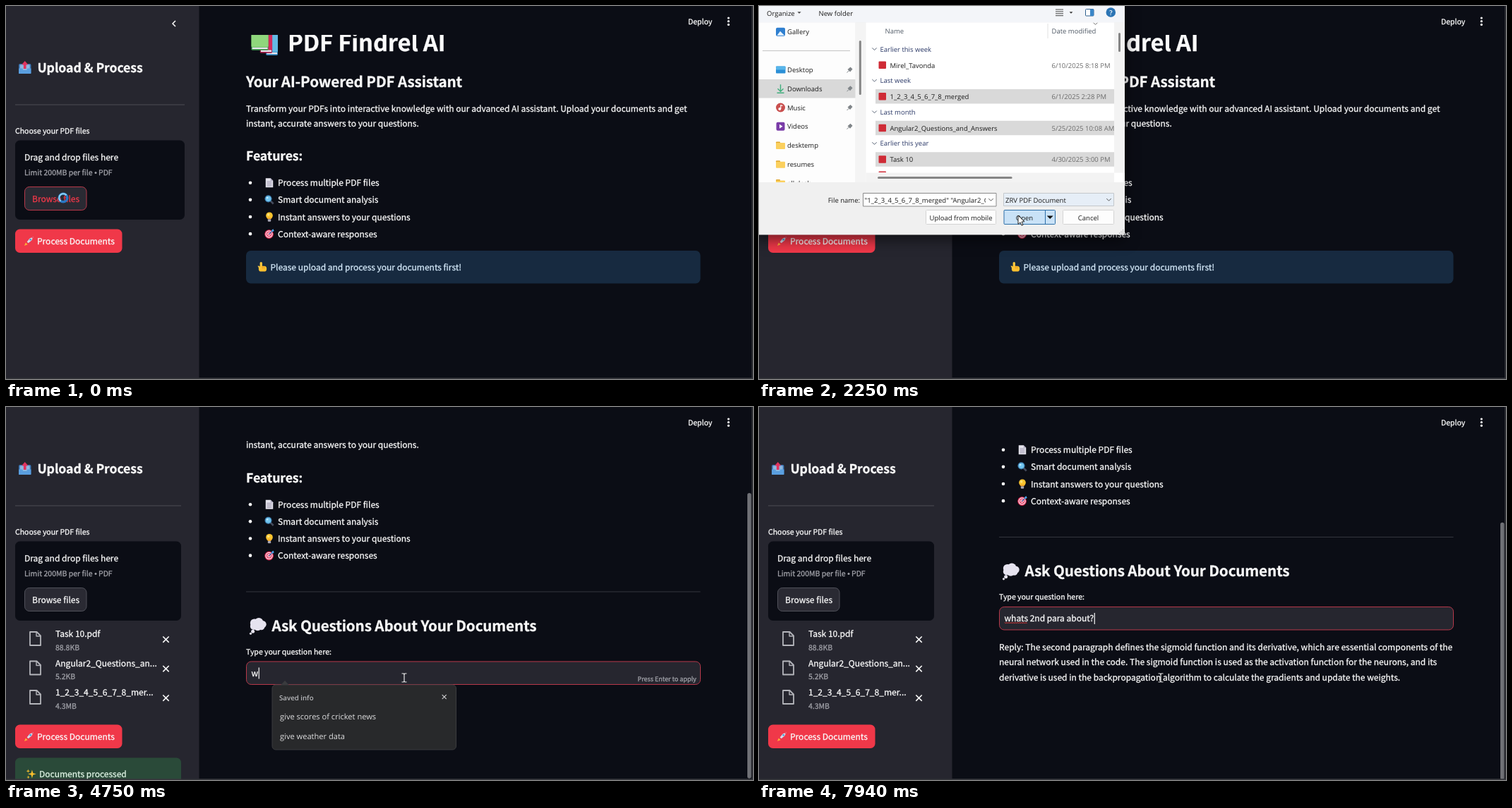
Write an HTML page with a canvas that moves like this. It is 1058 px wide and 529 px high and loops after 8 s.

```html
<!DOCTYPE html>
<html lang="en">
<head>
<meta charset="utf-8">
<title>PDF assistant demo</title>
<style>
html, body { margin: 0; width: 100%; height: 100%; overflow: hidden; background: #0b0d15; }
canvas { display: block; width: 1058px; height: 529px; }
</style>
</head>
<body>
<canvas id="stage" width="1058" height="529"></canvas>
<script>
const c = document.getElementById('stage').getContext('2d');
const LOOP = 8000;
const APP = '"Noto Sans CJK SC", "Noto Sans CJK JP", "Noto Sans CJK KR", "Noto Sans", sans-serif';
const UI = '"Open Sans", "Noto Sans", sans-serif';
const BG = '#0b0d15', SIDE = '#26262f', WHITE = '#fafafa', RED = '#f03849';

const T = {
  dialogOpen: 400, dialogClose: 2380, uploaded: 2700, processed: 3550,
  focus: 4250, firstKey: 4690, popupEnd: 4880, enter: 7050, reply: 7690
};

// ---------- helpers ----------
const clamp01 = v => Math.max(0, Math.min(1, v));
const ease = (t, a, b) => { const u = clamp01((t - a) / (b - a)); return u * u * (3 - 2 * u); };

function box(x, y, w, h, r, fill, stroke, lw = 1) {
  c.beginPath();
  c.roundRect(x, y, w, h, r);
  if (fill) { c.fillStyle = fill; c.fill(); }
  if (stroke) { c.strokeStyle = stroke; c.lineWidth = lw; c.stroke(); }
}
function disc(x, y, r, fill) {
  c.beginPath();
  c.arc(x, y, r, 0, 7);
  c.fillStyle = fill;
  c.fill();
}
function trace(points, close) {
  c.beginPath();
  points.forEach(([x, y]) => c.lineTo(x, y));
  if (close) c.closePath();
}
function poly(points, fill) { trace(points, true); c.fillStyle = fill; c.fill(); }
function line(points, color, lw = 1) {
  trace(points);
  c.strokeStyle = color;
  c.lineWidth = lw;
  c.stroke();
}
function clipped(x, y, w, h, draw) {
  c.save();
  c.beginPath();
  c.rect(x, y, w, h);
  c.clip();
  draw();
  c.restore();
}
function write(s, x, y, font, color, align = 'left', spacing = 0) {
  c.font = font;
  c.letterSpacing = spacing + 'px';
  c.textAlign = align;
  c.fillStyle = color;
  c.fillText(s, x, y);
}
// The CJK face draws its Latin letters larger than their nominal size.
const latinScale = { 400: 1.1105, 600: 1.132, 700: 1.117 };
const appFont = (px, weight = 400) => `${weight} ${px / latinScale[weight]}px ${APP}`;
function app(s, x, cy, px = 13.33, color = WHITE, weight = 400) {
  const y = cy + px * 0.34;
  write(s, x, y, appFont(px, weight), color, 'left', weight > 400 ? -px * 0.005 : 0);
  // A hairline outline brings the strokes up to the page's medium weight.
  c.strokeStyle = color;
  c.lineWidth = 0.3;
  c.lineJoin = 'round';
  c.strokeText(s, x, y);
}
function ui(s, x, cy, color = '#1c1c1c', align = 'left', px = 9.5, weight = 400) {
  write(s, x, cy + px * 0.37, `${weight} ${px}px ${UI}`, color, align);
}
const chevron = (x, y, r, color, lw = 1) => line([[x - r, y - r / 2], [x, y + r / 2], [x + r, y - r / 2]], color, lw);
const triangle = (x, y, r, color) => poly([[x - r, y - r / 2], [x + r, y - r / 2], [x, y + r / 2]], color);
function cross(x, y, r, color, lw) {
  line([[x - r, y - r], [x + r, y + r]], color, lw);
  line([[x - r, y + r], [x + r, y - r]], color, lw);
}

// ---------- emoji, each on a 16 unit square ----------
const emoji = {
  doc() {
    poly([[2, 0.5], [10, 0.5], [14, 4.5], [14, 15.5], [2, 15.5]], '#e4e3ec');
    poly([[10, 0.5], [14, 4.5], [10, 4.5]], '#aaa6bd');
    for (let i = 0; i < 4; i++) line([[4, 6 + i * 2.3], [12, 6 + i * 2.3]], '#8d87a0', 0.9);
  },
  glass() {
    line([[9.5, 9.5], [14.5, 14.5]], '#444b5c', 3);
    disc(6.3, 6.3, 5.8, '#3a78a8');
    disc(6.3, 6.3, 4.4, '#72c5ef');
    disc(4.8, 4.8, 1.5, '#c0ebff');
  },
  bulb() {
    disc(8, 6, 5.5, '#fbc42f');
    poly([[4, 9], [12, 9], [10.5, 12], [5.5, 12]], '#f2a92c');
    disc(6.5, 4.5, 2, '#ffe47c');
    box(5.5, 12, 5, 3.6, 1, '#a9a7b4');
  },
  target() {
    ['#e62e58', '#f6e9ef', '#e62e58', '#f6e9ef', '#e62e58'].forEach((k, i) => disc(7.5, 8.5, 7.2 - i * 1.45, k));
    line([[7.5, 8.5], [13, 3]], '#376fb5', 1.4);
    poly([[11.5, 4.5], [12, 1.5], [14.5, 0], [15, 2], [16, 2.5], [14, 4.5]], '#4aa3ea');
  },
  point() {
    box(4, 0.5, 3.6, 10, 1.8, '#ffc83d');
    box(2, 7, 12.5, 8.5, 4, '#ffc02f');
    poly([[0.5, 7], [2.5, 6.5], [5, 10], [4, 13]], '#ffc83d');
    for (const x of [8, 10.5]) line([[x, 7.5], [x, 11]], '#d88a1c', 0.8);
  },
  rocket() {
    poly([[4, 7], [8, 4.5], [7, 9]], '#e23a5e');
    poly([[9, 12], [11.5, 8], [7, 9]], '#e23a5e');
    poly([[5, 9], [9, 4], [15, 1], [12, 7], [7, 11]], '#dcdbe6');
    poly([[12, 2.4], [15, 1], [13.6, 4]], '#e23a5e');
    disc(10.3, 5.7, 1.5, '#4aa0d8');
    poly([[1, 15], [3, 10], [6, 13]], '#ffad38');
  },
  outbox() {
    box(0.5, 3.5, 15, 12, 1.5, '#3c78b8');
    box(2, 4.5, 12, 7, 1, '#8fb8e0');
    poly([[0.5, 9], [5, 9], [6, 11.5], [10, 11.5], [11, 9], [15.5, 9], [15.5, 15.5], [0.5, 15.5]], '#5a9fe0');
    poly([[8, 0], [12, 4.5], [9.6, 4.5], [9.6, 9.5], [6.4, 9.5], [6.4, 4.5], [4, 4.5]], '#e2335f');
  },
  books() {
    const book = (x, y, w, h, k, edge) => {
      box(x, y, w, h, 0.6, edge);
      box(x + 0.5, y + h - 1.7, w - 0.9, 1, 0, '#ece7f0');
      box(x, y, w, h - 1.9, 0.6, k);
    };
    book(8.8, 1.5, 7, 14.3, '#63b9e4', '#2c7fb4');
    book(5.3, 1, 7.2, 13.4, '#d22a5c', '#a01c48');
    book(0.2, 1, 10, 11.8, '#8fd67c', '#3f9a50');
  },
  cloud() {
    const puff = '#e6e3ef';
    for (const [x, y, r] of [[5, 5, 3.8], [9, 4.3, 4], [12.4, 6.2, 3.4], [8, 8, 4], [4.4, 8, 3.2], [11.4, 8.6, 2.8]]) disc(x, y, r, puff);
    disc(3.6, 12.6, 1.6, puff);
    disc(1.6, 14.6, 1, puff);
  },
  spark() {
    const star = (x, y, r) => {
      const p = [];
      for (let i = 0; i < 8; i++) {
        const a = i * Math.PI / 4, d = i % 2 ? r * 0.32 : r;
        p.push([x + d * Math.cos(a), y + d * Math.sin(a)]);
      }
      poly(p, '#fbc02d');
    };
    star(9.5, 8, 6.3);
    star(3.5, 3.5, 3);
    star(3.8, 12.8, 2.6);
  }
};
function icon(name, x, y, size) {
  c.save();
  c.translate(x, y);
  c.scale(size / 16, size / 16);
  emoji[name]();
  c.restore();
}

// ---------- state over time ----------
const mousePath = [
  [0, 81, 272], [500, 81, 272], [900, 150, 190], [1280, 128, 129], [1480, 128, 129], [1660, 153, 129],
  [1760, 230, 130], [1850, 232, 173], [1950, 222, 217], [2190, 367, 297], [2420, 367, 297],
  [3050, 117, 476], [3420, 117, 476], [3700, 420, 420], [4050, 564, 384], [7640, 564, 384], [7800, 569, 384]
];
function mouseAt(t) {
  for (let i = 1; i < mousePath.length; i++) {
    const [ta, xa, ya] = mousePath[i - 1], [tb, xb, yb] = mousePath[i];
    if (t <= tb) {
      const u = ease(t, ta, tb);
      return { x: xa + (xb - xa) * u, y: ya + (yb - ya) * u };
    }
  }
  const [, x, y] = mousePath[mousePath.length - 1];
  return { x, y };
}

const QUESTION = 'whats 2nd para about?';
const keyTimes = [[T.firstKey, 1], [4940, 2], [5690, 11], [5940, 14], [6630, 20], [6880, 21]];
function typedCount(t) {
  if (t < T.firstKey) return 0;
  for (let i = 1; i < keyTimes.length; i++) {
    const [ta, na] = keyTimes[i - 1], [tb, nb] = keyTimes[i];
    if (t < tb) return Math.floor(na + (nb - na) * (t - ta) / (tb - ta) + 1e-6);
  }
  return QUESTION.length;
}

// ---------- sidebar ----------
const files = [['Task 10.pdf', '88.8KB'], ['Angular2_Questions_an...', '5.2KB'], ['1_2_3_4_5_6_7_8_mer...', '4.3MB']];

function sidebar(t, mouse) {
  const uploaded = t >= T.uploaded, right = uploaded ? 248 : 253, hovered = mouse.x < 273;
  box(0, 0, 273.5, 527, 0, SIDE);
  if (hovered) {
    const x = right - 15;
    line([[x + 2, 21], [x - 2, 25], [x + 2, 29]], WHITE, 1.6);
  }
  icon('outbox', 17.5, 78, 18.5);
  app('Upload & Process', 44.5, 87.5, 20, WHITE, 600);
  box(13, 139.5, right - 13, 1, 0, '#4c4c54');
  app('Choose your PDF files', 13, 177, 11.67);
  box(13, 190.5, right - 13, 112.5, 6.7, BG);
  app('Drag and drop files here', 26, 214.5);
  app('Limit 200MB per file', 26, 236, 11.67, '#a0a1a8');
  disc(127, 236.5, 1.5, '#a0a1a8');
  app('PDF', 131, 236, 11.67, '#a0a1a8');
  const hot = t < T.dialogOpen;
  box(26.5, 256.5, 87.5, 33, 6.7, '#2a2a33', hot ? '#b8394a' : '#50515a');
  app('Browse files', 37, 273, 13.33, hot ? RED : WHITE);

  if (uploaded) files.forEach(([name, size], i) => {
    const y = i * 41.5;
    trace([[34, 319 + y], [43.5, 319 + y], [49, 324.5 + y], [49, 338 + y], [34, 338 + y]], true);
    c.strokeStyle = '#b4b5bb';
    c.lineWidth = 1.8;
    c.lineJoin = 'round';
    c.stroke();
    line([[43, 319 + y], [43, 325 + y], [49, 325 + y]], '#b4b5bb', 1.4);
    app(name, 70, 321.5 + y);
    app(size, 70, 340.7 + y, 11.67, '#a0a1a8');
    cross(226.5, 329.7 + y, 4.2, WHITE, 1.6);
  });

  const by = uploaded ? 450.5 : 316.5;
  box(13, by, 151.5, 33.5, 6.7, RED);
  icon('rocket', 25, by + 9.5, 15);
  app('Process Documents', 44, by + 16.7);

  if (t >= T.processed && t < T.enter) {
    box(13, 497.5, 235, 40, 6.7, '#2a4a39');
    icon('spark', 28, 513, 15);
    app('Documents processed', 47, 520.7, 13.33, '#dff3e5');
  }
  if (uploaded && hovered) box(268, -4, 5.5, 500, 3, '#707178');
}

// ---------- main page ----------
const features = [['doc', 'Process multiple PDF files'], ['glass', 'Smart document analysis'],
  ['bulb', 'Instant answers to your questions'], ['target', 'Context-aware responses']];
const reply = [
  'Reply: The second paragraph defines the sigmoid function and its derivative, which are essential components of the',
  'neural network used in the code. The sigmoid function is used as the activation function for the neurons, and its',
  'derivative is used in the backpropagation algorithm to calculate the gradients and update the weights.'
];

function questionBox(t) {
  const count = typedCount(t), focused = t >= T.focus, typed = QUESTION.slice(0, count);
  box(340.5, 473.5, 643, 32.5, 6.7, SIDE, focused ? '#b8384a' : SIDE);
  app(typed, 347.5, 489.7);
  if (focused) box(348 + c.measureText(typed).width, 482, 1.2, 16, 0, WHITE);
  if (count > 5) {
    const end = 347.5 + c.measureText('whats').width, wave = [];
    for (let x = 348; x <= end; x += 1.5) wave.push([x, 496 + (wave.length % 2 ? 1 : -0.6)]);
    line(wave, '#e23b3b', 1);
  }
  if (count && t < T.enter) app('Press Enter to apply', 894.5, 498, 10, '#a0a1a8');
}

function page(t) {
  icon('books', 347, 32, 38.5);
  app('PDF Findrel AI', 399, 51.5, 36.67, WHITE, 700);
  app('Your AI-Powered PDF Assistant', 340, 107, 23.33, WHITE, 600);
  app('Transform your PDFs into interactive knowledge with our advanced AI assistant. Upload your documents and get', 340, 145);
  app('instant, accurate answers to your questions.', 340, 166.3);
  app('Features:', 340, 212.5, 20, WHITE, 600);
  features.forEach(([name, label], i) => {
    const y = 250.7 + i * 24.15;
    disc(346, y, 2.3, WHITE);
    icon(name, 366, y - 7, 14);
    app(label, 385, y);
  });
  if (t < T.processed) {
    box(340, 347, 643.5, 46.5, 6.7, '#172a40');
    icon('point', 356, 362.5, 14.5);
    app('Please upload and process your documents first!', 374.5, 370.3, 13.33, '#d3e8f8');
    return;
  }
  box(340, 374, 643.5, 1, 0, '#34363e');
  icon('cloud', 344, 411, 25);
  app('Ask Questions About Your Documents', 376.5, 422.5, 23.33, WHITE, 600);
  app('Type your question here:', 340, 459.5, 11.67);
  questionBox(t);
  if (t >= T.reply) reply.forEach((s, i) => app(s, 340, 530.3 + i * 21.4));
}

function popup() {
  poly([[389, 394.5], [395, 388], [401, 394.5]], '#3a3b3e');
  box(377, 394, 260.5, 92, 5, '#28292b', '#3a3b3e');
  ui('Saved info', 387, 412, '#b9babd', 'left', 9.7, 600);
  cross(620.7, 411.2, 3, '#d4d4d6', 1.1);
  ui('give scores of cricket news', 388, 438.7, '#dededf', 'left', 11.1);
  ui('give weather data', 388, 467, '#dededf', 'left', 11.1);
}

function main(t, mouse) {
  const scroll = 112.5 * ease(t, 3700, 3950) + 77.5 * ease(t, T.reply, T.reply + 150);
  clipped(273.5, 41, 783, 486, () => {
    c.translate(0, -scroll);
    page(t);
  });
  app('Deploy', 966, 21.7, 11.67);
  for (const y of [17, 21.7, 26.4]) disc(1023.3, y, 1.6, WHITE);
  if (t >= T.processed && mouse.x > 273) {
    const pageHeight = t < T.reply ? 686 : 761;
    box(1050, 527 * (46.3 + scroll) / pageHeight, 5.5, 527 * 527 / pageHeight, 3, '#6f7075');
  }
  if (t >= T.firstKey && t < T.popupEnd) popup();
}

// ---------- file dialog ----------
const places = [['Gallery', 36.7], ['Desktop', 90.5], ['Downloads', 117.2], ['Music', 144], ['Videos', 170.7],
  ['desktemp', 197.5], ['resumes', 224.2], ['all desk', 251]];
const groups = [
  ['Earlier this week', 'Mirel_Tavonda', '6/10/2025 8:18 PM'],
  ['Last week', '1_2_3_4_5_6_7_8_merged', '6/1/2025 2:28 PM'],
  ['Last month', 'Angular2_Questions_and_Answers', '5/25/2025 10:08 AM'],
  ['Earlier this year', 'Task 10', '4/30/2025 3:00 PM']
];

function placeIcon(i, y) {
  if (i === 0) {
    box(24, y - 6, 13, 12, 2, '#2f7fd0');
    poly([[25.5, y + 5], [30, y - 1], [36, y + 5]], '#e6f3ff');
  } else if (i === 1) {
    box(24, y - 5, 13.5, 10, 1, '#2b8fd6');
    box(24, y - 5, 13.5, 5, 1, '#58b5ea');
  } else if (i === 2) {
    line([[30.5, y - 6], [30.5, y + 3]], '#3fae7c', 1.4);
    line([[26.5, y], [30.5, y + 4], [34.5, y]], '#3fae7c', 1.4);
    line([[25.5, y + 6], [35.5, y + 6]], '#3fae7c', 1.4);
  } else if (i === 3) {
    disc(30.5, y, 6.5, '#c9504f');
    disc(29.3, y + 2, 1.9, '#fff');
    line([[30.8, y + 2], [30.8, y - 3.5], [33.5, y - 2.5]], '#fff', 1.2);
  } else if (i === 4) {
    box(24.5, y - 6, 12, 12, 2, '#7a3ca8');
    poly([[29, y - 3], [33.5, y], [29, y + 3]], '#fff');
  } else {
    box(24, y - 5, 6, 4, 1, '#e0a52c');
    box(24, y - 3.5, 13, 9, 1, '#fbd05e');
  }
}

function dialogPlaces(d, listFocus) {
  box(0, 23, 112 + d, 227, 0, '#fdfdfd');
  box(112 + d, 23, 15, 227, 0, '#f4f4f4');
  if (listFocus) box(0, 104, 112 + d, 26.5, 0, '#d9d9d9');
  else box(-1, 104, 112.5 + d, 26, 0, '#cfe5f8', '#27618f');
  box(5, 63, 99.5 + d, 1, 0, '#c4c4c4');
  places.forEach(([name, y], i) => {
    placeIcon(i, y);
    ui(name, 40, y);
    if (i > 0 && i < 5) {
      const x = 104 + d;
      line([[x - 4, y + 4], [x - 0.5, y + 0.5]], '#808589', 1);
      poly([[x - 3, y - 0.5], [x + 1, y - 4], [x + 4, y - 1], [x + 0.5, y + 3]], '#808589');
    }
  });
  box(117.3 + d, 49, 3, 77, 1.5, '#868686');
}

function dialogList(d, picked, blurred) {
  box(127 + d, 23, 376 - d, 227, 0, '#fff');
  ui('Name', 154 + d, 35.7, '#505a66');
  ui('Date modified', 390 + d, 35.7, '#505a66');
  box(384 + d, 25, 1, 21, 0, '#e2e2e2');
  chevron(452 + d, 25, 3, '#777');
  clipped(127 + d, 46, 376 - d, 190, () => {
    groups.forEach(([group, name, date], i) => {
      const y = 61 + i * 44.6, row = y + 23;
      chevron(139 + d, y, 3.2, '#5a6577');
      ui(group, 147 + d, y, '#2c3a68');
      if (i > 0 && i <= picked) box(140.5 + d, row - 10.5, 400, 20.5, 0, blurred ? '#d9d9d9' : '#cce8ff');
      box(145 + d, row - 5.5, 10.5, 10.5, 1, '#cf2b36');
      ui(name, 161 + d, row);
      ui(date, 390 + d, row, '#6a6a6a');
    });
    box(145 + d, 234.5, 10.5, 10.5, 1, '#cf2b36');
  });
  box(127 + d, 236.5, 376 - d, 13.5, 0, '#f3f3f3');
  box(143.5 + d, 242, 220 - d * 1.2, 3, 1.5, '#868686');
  box(503, 23, 15, 213.5, 0, '#f3f3f3');
  box(503, 236.5, 15, 13.5, 0, '#fff');
  box(509, 38, 3, 27, 1.5, '#868686');
}

function dialog(t) {
  const d = 24.5 * ease(t, 1480, 1660);
  const picked = [1770, 1860, 1960].filter(s => t >= s).length;
  const overOpen = t > 2140;
  c.save();
  c.shadowColor = 'rgba(0,0,0,.55)';
  c.shadowBlur = 20;
  c.shadowOffsetY = 7;
  box(-8, -8, 526, 332.5, 3, '#f0f0f0');
  c.restore();
  box(0, 0, 518, 23.5, 0, '#f3f5f9');

  ui('Organize', 11, 10);
  triangle(57, 9.5, 2.6, '#444');
  ui('New folder', 84.5, 10);
  for (let i = 0; i < 4; i++) box(420, 4.5 + i * 2.9, 11, 1, 0, '#444');
  triangle(442, 9.5, 2.4, '#333');
  box(462.5, 4.5, 11.5, 9.5, 1, '#fff', '#2d5f8e');
  box(469, 4.5, 5, 9.5, 0, '#3a86c8');
  disc(498.3, 9, 6.8, '#2b74b4');
  ui('?', 498.3, 9, '#fff', 'center', 9.5, 600);

  clipped(0, 23.5, 518, 226.5, () => {
    dialogPlaces(d, picked > 0);
    dialogList(d, picked, overOpen);
  });

  ui('File name:', 143, 275, '#1c1c1c', 'right');
  box(147.5, 265.5, 188.5, 18.5, 0, '#fff', '#8a8a8a');
  clipped(148, 266, 173, 18, () => {
    const names = groups.slice(1, 1 + picked).map(g => g[1]);
    ui(picked > 1 ? names.map(n => `"${n}"`).join(' ') : names.join(''), 149.5, 275);
  });
  chevron(328.5, 274.7, 3.2, '#555');
  box(346.5, 265.5, 156, 18, 0, overOpen ? '#e6eef7' : '#fdfdfd', '#c4c8cc');
  ui('ZRV PDF Document', 349, 275);
  chevron(495.5, 274.7, 3.2, '#555');

  box(236.5, 289.5, 99, 20, 1, '#fdfdfd', '#d4d4d4');
  ui('Upload from mobile', 286, 300, '#1c1c1c', 'center');
  box(347, 289.5, 72.5, 20, 1, overOpen ? '#c9e2f7' : '#fdfdfd', '#2d6fa8');
  box(405, 290, 1, 19, 0, '#2d6fa8');
  ui('Open', 376, 300, '#1c1c1c', 'center');
  triangle(412.2, 299.7, 4.5, '#111');
  box(430.5, 289.5, 72, 20, 1, '#fdfdfd', '#d4d4d4');
  ui('Cancel', 466.5, 300, '#1c1c1c', 'center');
  for (let i = 0; i < 3; i++) for (let j = 0; j <= i; j++) box(515 - j * 2.5, 317 + i * 2.3, 1.2, 1.2, 0, '#a8a8a8');
}

// ---------- pointer ----------
function shape(points, fill, edge) {
  trace(points, true);
  c.fillStyle = fill;
  c.fill();
  c.strokeStyle = edge;
  c.lineWidth = 1;
  c.stroke();
}
const pointers = {
  busy() {
    c.beginPath();
    c.arc(0, 0, 5.8, 0, 7);
    c.strokeStyle = '#2a78c4';
    c.lineWidth = 3.4;
    c.stroke();
    c.beginPath();
    c.arc(0, 0, 5.8, 2.2, 5.6);
    c.strokeStyle = '#8fd2f4';
    c.lineWidth = 2;
    c.stroke();
  },
  arrow() {
    shape([[0, 0], [0, 12.5], [3, 9.8], [5, 14.2], [7, 13.3], [5.1, 9], [9, 8.8]], '#fff', '#222');
  },
  resize() {
    shape([[-9, 0], [-5, -4], [-5, -1.3], [5, -1.3], [5, -4], [9, 0], [5, 4], [5, 1.3], [-5, 1.3], [-5, 4]], '#fff', '#333');
  },
  hand() {
    shape([[-1.3, 0], [0.5, -0.8], [1.7, 0.4], [1.7, 5], [7, 6.2], [7.6, 8], [6.6, 14.5], [-0.5, 14.5], [-4.2, 9.5], [-3.2, 8], [-1.3, 9]], '#fff', '#222');
  },
  beam() {
    line([[0, -5], [0, 5]], '#e8e8e8', 1.2);
    for (const y of [-6, 6]) line([[-3.5, y], [-1, y], [0, y * 0.85], [1, y], [3.5, y]], '#e8e8e8', 1.2);
  }
};
function pointerKind(t, mouse) {
  if (t < T.dialogOpen) return 'busy';
  if (t > 1200 && t < 1670) return 'resize';
  if (t > T.uploaded && mouse.x > 13 && mouse.x < 164 && mouse.y > 450) return 'hand';
  if (t > 3980) return 'beam';
  return 'arrow';
}

// ---------- frame ----------
function render(t) {
  const mouse = mouseAt(t);
  box(0, 0, 1058, 529, 0, BG);
  sidebar(t, mouse);
  main(t, mouse);
  box(1056, 0, 2, 529, 0, '#2b2c31');
  box(0, 527.3, 1058, 1.7, 0, '#36373c');
  if (t >= T.dialogOpen && t < T.dialogClose) dialog(t);
  c.save();
  c.translate(mouse.x, mouse.y);
  pointers[pointerKind(t, mouse)]();
  c.restore();
}
function tick() {
  render(performance.now() % LOOP);
  requestAnimationFrame(tick);
}
c.textRendering = 'geometricPrecision';
tick();
</script>
</body>
</html>
```
